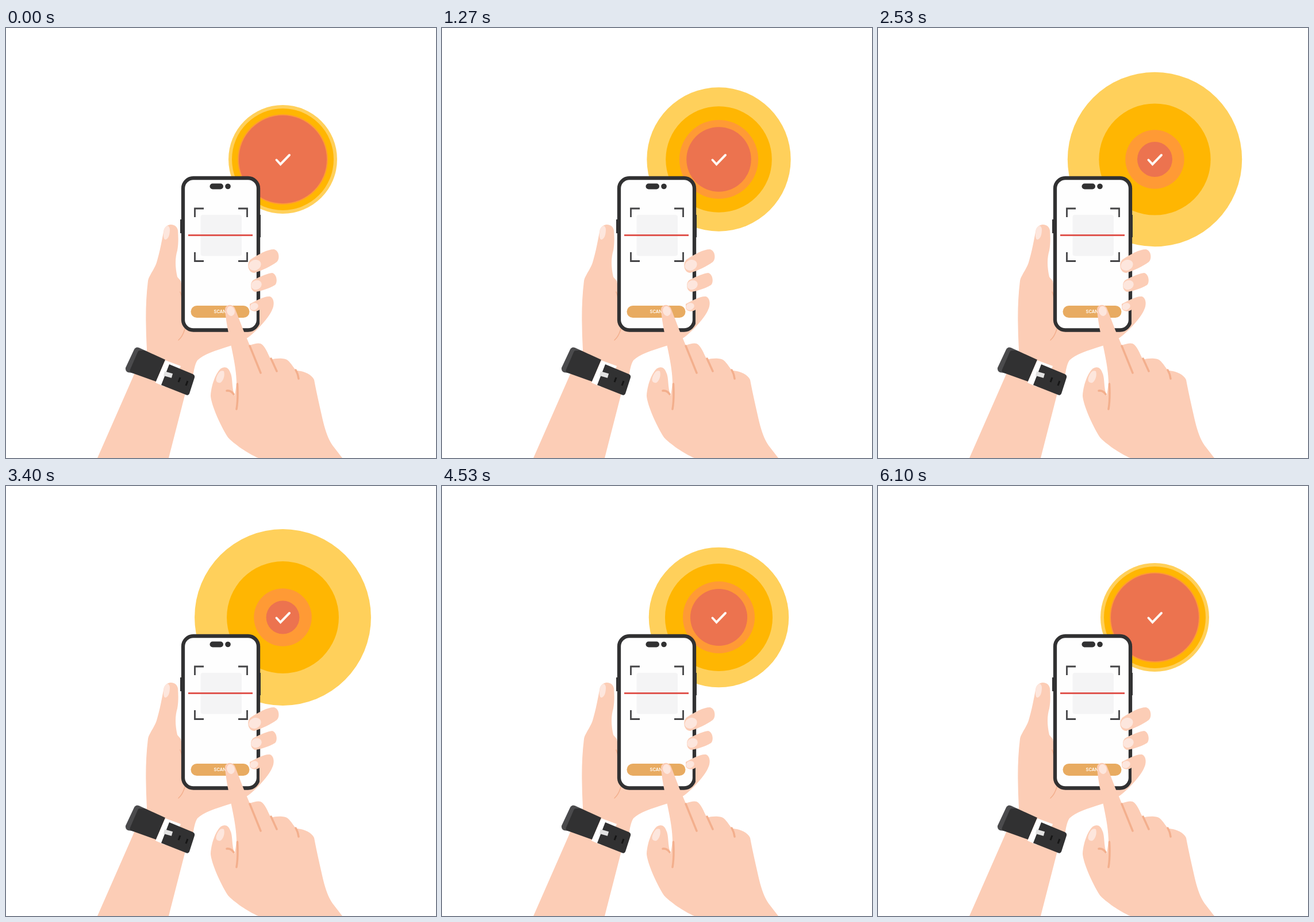
Animation, 748 px wide and 748 px high, one loop 6410 ms. Source, as an HTML page:

```html
<!DOCTYPE html>
<html lang="en">
<head>
<meta charset="utf-8">
<title>Scan</title>
<style>
  html, body { margin: 0; width: 100%; height: 100%; overflow: hidden; background: #fff; }
  svg { display: block; width: 100%; height: 100%; }
  .skin { fill: #fccdb6; }
  .nail { fill: #fde6dd; }
  .dark { fill: #313132; }
  .crease { fill: none; stroke: #f3af8d; stroke-linecap: round; }
  text { font: 600 7.5px Inter, "Liberation Sans", sans-serif; fill: #fff; }
</style>
</head>
<body>
<svg viewBox="0 0 748 748">
  <g id="rings">
    <circle cx="481.5" cy="228.5" fill="#ffd05b"/>
    <circle cx="481.5" cy="228.5" fill="#ffb602"/>
    <circle cx="481.5" cy="228.5" fill="#ff9a35"/>
    <circle cx="481.5" cy="228.5" fill="#ec734f"/>
  </g>
  <path d="M470.500 229.500l7 7.500 15.500-16" fill="none" stroke="#fff8f3" stroke-width="4" stroke-linecap="round"/>

  <!-- holding arm and palm -->
  <path class="skin" d="M159 748L224 600 245 560C243 520 242 480 247 440 248 432 258 420 262 408 268 388 271 370 275 350 281 338 297 340 299 352 300 365 300 376 298 387 294 400 294 415 298 433L304 440 320 515H441L463 490C458 502 444 518 432 529 420 541 405 549 390 553 364 561 343 568 333 578 328 586 327 596 325 606L311 639 283 748Z"/>
  <path class="nail" d="M275 350C279 342 284 343 285 350 285 359 283 366 278 368 274 369 273 362 275 350Z"/>
  <path class="crease" stroke-width="1.500" d="M303 459Q306 466 306 475M311 524Q307 537 300 543"/>

  <!-- watch strap -->
  <path fill="#4b4b4d" d="M208 591L223 559Q226 554 231 556L242 561 226 601 212 599Q207 596 208 591Z"/>
  <path class="dark" d="M233 561L242 561 277 577 261 615 219 600Q214 598 216 594L229 564Q230 561 233 561Z"/>
  <path fill="#fff" d="M277 578L304 588 300 598 276 624 260 617Z"/>
  <path class="dark" d="M284 585L325 602Q329 604 328 608L319 636Q317 640 313 638L270 621Z"/>
  <path fill="none" stroke="#e2e2e2" stroke-width="8" d="M275 601L289 605"/>
  <path fill="none" stroke="#161616" stroke-width="3" d="M303 608L300 616M316 614L313 622"/>

  <!-- phone -->
  <path class="dark" d="M303 333h4v24h-4zM440 325h3v39h-3z"/>
  <rect x="308" y="261" width="131" height="264.500" rx="18" fill="#fefefe" stroke="#313132" stroke-width="6.300"/>
  <rect class="dark" x="354.500" y="270.500" width="23.500" height="10" rx="5"/>
  <circle class="dark" cx="386" cy="275.500" r="4.800"/>
  <rect x="338.500" y="325" width="71.500" height="71.500" rx="4" fill="#f4f4f5"/>
  <path d="M328.500 329v-15h15.500M404 314h15.500v15M419.500 390v15.500H404M344 405.500h-15.500V390" fill="none" stroke="#444446" stroke-width="2.800"/>
  <path d="M317 360.500H429" stroke="#e0564f" stroke-width="3"/>
  <rect x="321.500" y="483" width="102" height="21" rx="10.500" fill="#e8ab61"/>
  <text x="361.500" y="496.300">SCAN</text>

  <!-- holding fingers -->
  <path class="skin" d="M425 403C440 393 455 385 466 385 475 387 477 401 471 407 460 415 445 422 432 426 421 426 418 410 425 403Z"/>
  <path class="skin" d="M431 438C445 431 455 427 463 426 471 428 473 442 468 447 458 453 445 457 434 459 425 458 423 443 431 438Z"/>
  <path class="skin" d="M424 480C435 474 450 466 459 467 467 470 467 482 463 490 457 502 448 511 441 519V490C436 494 428 494 424 488Z"/>
  <g class="nail">
    <ellipse cx="433" cy="412.500" rx="11" ry="9" transform="rotate(-25 433 412.500)"/>
    <ellipse cx="435.500" cy="447" rx="9.500" ry="8" transform="rotate(-25 435.500 447)"/>
    <ellipse cx="431.500" cy="484.500" rx="7.500" ry="6" transform="rotate(-25 431.500 484.500)"/>
  </g>

  <!-- tapping hand -->
  <path class="skin" d="M381 491C380 481 393 478 398 487L413 526 424 552C435 548 442 547 446 551 453 558 456 568 461 577 470 574 485 574 490 578 497 584 500 591 505 596 516 596 532 602 536 612 540 634 547 664 552 686 556 702 561 716 568 726L585 748H439C420 740 396 723 386 712 372 690 357 655 356 640 357 622 364 602 373 593 380 588 387 590 390 599 395 608 392 626 398 640L401 618C401 580 385 535 381 491Z"/>
  <ellipse class="nail" cx="391" cy="492.500" rx="6.800" ry="8.500" transform="rotate(-15 391 492.500)"/>
  <path class="nail" d="M366 608C369 599 374 594 379 597 381 603 379 613 373 617 368 618 364 615 366 608Z"/>
  <path class="crease" stroke-width="3.500" d="M424 553L443 600M461 575L471 597M504 595Q508 602 509 610M402.500 619Q404 645 401 663M384 631Q391 630 396 637"/>
</svg>
<script>
const LOOP = 6410, GROW = 70, SHRINK = 3240, SPAN = 2900;
const STEADY = [.33, .57], SETTLE = [.33, .63];
// start radius, end radius, opening easing, closing easing
const rings = [
  [94.5, 154, [.25, .6, .15], [.33, .46]],
  [88.5, 97.5, STEADY, SETTLE],
  [78.5, 50, [.45, .55], SETTLE],
  [76.5, 28.5, STEADY, SETTLE]
];
const circles = document.querySelectorAll('#rings circle');

// cubic easing with handles (x1, y1) and (x2, 1)
function ease(x, [x1, x2, y1 = 0]) {
  if (x <= 0) return 0;
  if (x >= 1) return 1;
  const curve = (s, a, b) => 3 * (1 - s) * s * ((1 - s) * a + s * b) + s ** 3;
  let lo = 0, hi = 1;
  for (let i = 0; i < 24; i++) {
    const mid = (lo + hi) / 2;
    if (curve(mid, x1, x2) < x) lo = mid; else hi = mid;
  }
  return curve(lo, y1, 1);
}

function draw(now) {
  const t = now % LOOP;
  rings.forEach(([from, to, open, close], i) => {
    const p = ease((t - GROW) / SPAN, open) - ease((t - SHRINK) / SPAN, close);
    circles[i].setAttribute('r', from + (to - from) * p);
  });
}

const start = performance.now();
(function tick() {
  draw(performance.now() - start);
  requestAnimationFrame(tick);
})();
</script>
</body>
</html>
```
